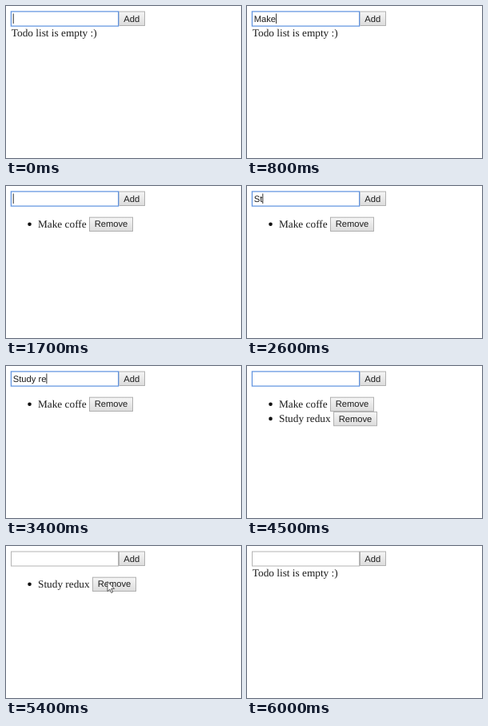
These frames come from a looping animation (294 by 190 pixels, 6.4 s). An HTML page:

```html
<!DOCTYPE html>
<html lang="en">
<head>
<meta charset="utf-8">
<title>Todo list</title>
<style>
  html, body { margin: 0; width: 100%; height: 100%; overflow: hidden; background: #fff; }
  svg { display: block; width: 100%; height: 100%; }
  text { white-space: pre; text-rendering: geometricPrecision; fill: #1c1c1c; }
  .page { font: 13.3px "Liberation Serif", serif; }
  .control { font: 11.2px "Liberation Sans", sans-serif; }
  .button { fill: url(#face); stroke: #b0b0b0; }
  #field { fill: #fff; stroke: #b4b4b4; }
  #field.focused { stroke: #5f92de; }
  #glow { fill: none; stroke: #b9d2f5; stroke-width: 2; }
</style>
</head>
<body>
<svg viewBox="0 0 294 190">
  <defs>
    <linearGradient id="face" x2="0" y2="1">
      <stop stop-color="#f6f6f6"/>
      <stop offset="1" stop-color="#dcdcdc"/>
    </linearGradient>
  </defs>
  <rect class="button" x="141.5" y="7" width="32" height="17.5"/>
  <text class="control" x="147.3" y="19.6">Add</text>
  <rect id="glow" x="6.5" y="7" width="134" height="18"/>
  <rect id="field" x="6.5" y="7" width="134" height="18"/>
  <text id="typed" class="control" x="8.7" y="19.8"></text>
  <rect id="caret" x="8.7" y="9.5" width="1" height="12.5" fill="#333"/>
  <text id="empty" class="page" x="6.8" y="37.6">Todo list is empty :)</text>
  <g id="coffee">
    <circle cx="29.5" cy="47.7" r="2.3" fill="#111"/>
    <text class="page" x="40" y="51.6">Make coffe</text>
    <rect class="button" x="104.5" y="39.2" width="54" height="17.3"/>
    <text class="control" x="110.7" y="51.4">Remove</text>
  </g>
  <g id="study">
    <circle cx="29.5" cy="47.7" r="2.3" fill="#111"/>
    <text class="page" x="40" y="51.6">Study redux</text>
    <rect class="button" x="108.5" y="39.2" width="54" height="17.3"/>
    <text class="control" x="114.7" y="51.4">Remove</text>
  </g>
  <path id="pointer" d="M0 0V12.2L2.8 9.6L4.7 14L6.6 13.2L4.7 8.9H8.6Z" fill="#fff" stroke="#333" stroke-width=".8"/>
</svg>
<script>
  const LOOP = 6400;
  const CARET_HOLD = 400;
  const TEXT_X = 8.7;

  // Time of each keystroke and the field's content after it.
  const keys = [
    [0, ""], [300, "M"], [400, "Ma"], [600, "Mak"], [700, "Make"], [900, "Make "],
    [1100, "Make c"], [1200, "Make co"], [1400, "Make cof"], [1500, "Make coff"],
    [1600, "Make coffe"], [1700, ""],
    [2400, "S"], [2600, "St"], [2800, "Stu"], [2900, "Stud"], [3000, "Study"],
    [3300, "Study r"], [3400, "Study re"], [3600, "Study red"], [3700, "Study redu"],
    [3900, "Study redux"], [4100, ""]
  ];
  const addCoffee = 1700, addStudy = 4100, removeCoffee = 5300, removeStudy = 5700;
  const pointerIn = 4800, pointerRest = 5100, pointerOut = 6000;

  const el = id => document.getElementById(id);
  const show = (id, visible) => el(id).setAttribute("visibility", visible ? "visible" : "hidden");
  const between = (t, start, end) => t >= start && t < end;
  const place = (id, x, y) => el(id).setAttribute("transform", `translate(${x} ${y})`);

  function draw(t) {
    const [keyTime, content] = keys.findLast(([time]) => time <= t);
    const typed = el("typed");
    if (typed.textContent !== content) typed.textContent = content;
    const width = content ? typed.getComputedTextLength() : 0;
    el("caret").setAttribute("x", TEXT_X + width);
    show("caret", t - keyTime < CARET_HOLD);

    const focused = t < removeCoffee;
    el("field").classList.toggle("focused", focused);
    show("glow", focused);

    show("empty", !between(t, addCoffee, removeStudy));
    show("coffee", between(t, addCoffee, removeCoffee));
    show("study", between(t, addStudy, removeStudy));
    place("study", 0, t < removeCoffee ? 18.2 : 0);

    const progress = Math.min(1, Math.max(0, (t - pointerIn) / (pointerRest - pointerIn)));
    const away = (1 - progress) ** 2;
    place("pointer", 127 + 13 * away, 44.5 + 16 * away);
    show("pointer", between(t, pointerIn, pointerOut));
  }

  function frame() {
    draw(Math.floor(performance.now() % LOOP / 100) * 100);
    requestAnimationFrame(frame);
  }
  frame();
</script>
</body>
</html>
```
